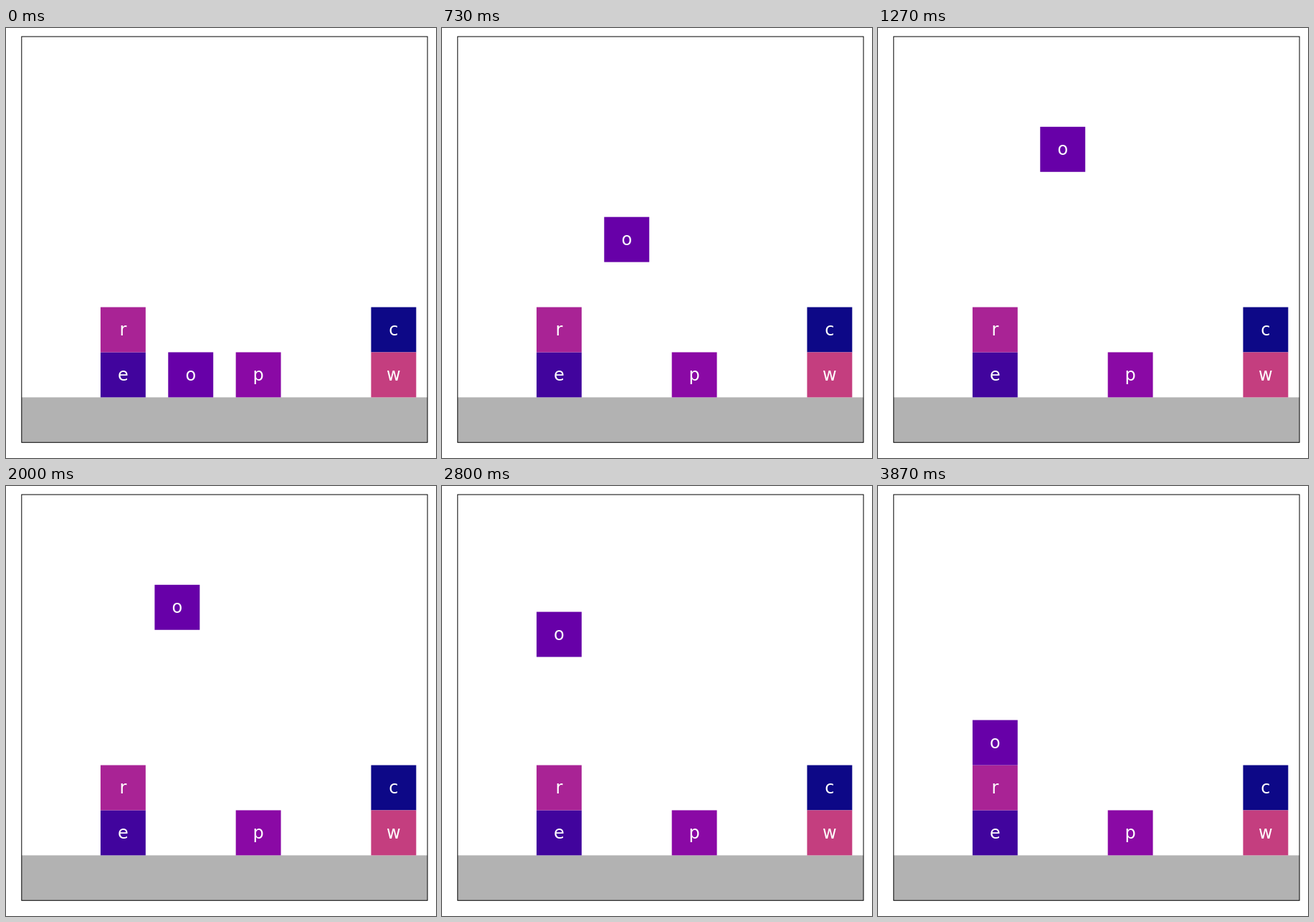
Write an HTML page that moves like this. It is 600 px wide and 600 px high and loops after 4.87 s.

```html
<!DOCTYPE html>
<html lang="en">
<head>
<meta charset="utf-8">
<title>Stacking blocks</title>
<style>
  html, body { margin: 0; width: 100%; height: 100%; overflow: hidden; background: #fff; }
  svg { display: block; width: 100vw; height: 100vh; }
  text { font: 24px "DejaVu Sans", sans-serif; fill: #fff; text-anchor: middle; }
</style>
</head>
<body>
<svg id="stage" viewBox="0 0 600 600"></svg>
<script>
const UNIT = 62.92, LEFT = 21.8, TOP = 12, SIZE = 9 * UNIT;
const LOOP = 4870, STEP = 1000 / 15;
const stage = document.getElementById("stage");

function add(parent, tag, attrs) {
  const el = document.createElementNS("http://www.w3.org/2000/svg", tag);
  for (const key in attrs) el.setAttribute(key, attrs[key]);
  return parent.appendChild(el);
}

// Block positions are in units from the top left corner of the room.
function place(block, x, y) {
  block.setAttribute("transform", `translate(${LEFT + x * UNIT} ${TOP + y * UNIT})`);
}

function addBlock(letter, fill, x, y) {
  const block = add(stage, "g", {});
  add(block, "rect", { width: UNIT, height: UNIT, fill });
  add(block, "text", { x: UNIT / 2, y: 39.5 }).textContent = letter;
  place(block, x, y);
  return block;
}

add(stage, "rect", { x: LEFT, y: TOP + 8 * UNIT, width: SIZE, height: UNIT, fill: "#b2b2b2" });
add(stage, "rect", { x: LEFT, y: TOP, width: SIZE, height: SIZE, fill: "none", stroke: "#000" });
addBlock("c", "#0d0887", 7.75, 6);
addBlock("e", "#41049d", 1.75, 7);
addBlock("p", "#8a09a5", 4.75, 7);
addBlock("r", "#a92395", 1.75, 6);
addBlock("w", "#c43e7f", 7.75, 7);
const mover = addBlock("o", "#6700a8", 3.25, 7);

const clamp = (v, max) => Math.max(0, Math.min(v, max));

function draw(now) {
  const n = Math.floor((now % LOOP + 3.34) / STEP);
  // Lift and slide both set off with a double step.
  const lift = n < 1 ? 0 : clamp(n + 1, 20) * 0.25;
  const slide = n < 30 ? 0 : clamp(n - 28, 10) * 0.15;
  const drop = clamp(n - 38, 20) * 0.15;
  place(mover, 3.25 - slide, 7 - lift + drop);
}

const start = performance.now();
function tick() {
  draw(performance.now() - start);
  requestAnimationFrame(tick);
}
tick();
</script>
</body>
</html>
```
